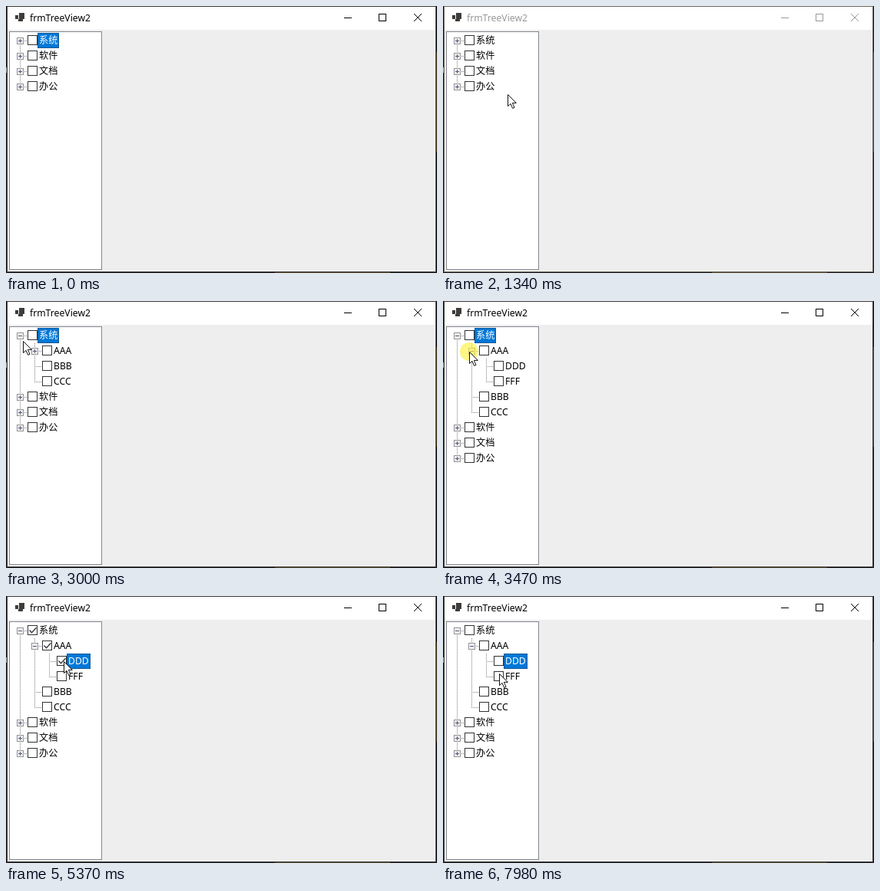
Animation of 561x348 px, one loop 8000 ms. Source, as an HTML page:

```html
<!DOCTYPE html>
<html lang="zh-CN">
<head>
<meta charset="utf-8">
<style>
html, body { margin: 0; width: 100%; height: 100%; overflow: hidden; }
svg { display: block; }
text { font: 12.2px "Noto Sans", "Noto Sans CJK SC", "Noto Sans CJK", sans-serif; }
.px { shape-rendering: crispEdges; }
.dots { stroke: #808080; stroke-dasharray: 1 1; }
</style>
</head>
<body>
<svg width="561" height="348" viewBox="0 0 561 348" fill="none">
  <g id="window"></g>
  <circle id="halo" r="12" fill="#fbf03c" fill-opacity=".62"/>
  <path id="cursor" d="M.5 .5V15.6L4 12.4L6.6 18.4L9 17.4L6.4 11.4H11.3Z" fill="#fff" stroke="#111"/>
</svg>
<script>
const LOOP = 8000, STEP = 70;
const $ = id => document.getElementById(id);

// Pointer keys: time, x, y
const path = [
  [440, 334, 330], [790, 117, 165], [920, 117, 165], [1340, 84, 115], [1760, 40, 64],
  [2320, 20, 49], [2930, 20, 49], [3350, 34, 66], [3530, 34, 66], [3740, 36, 81],
  [4020, 62, 108], [4160, 77, 96], [4350, 77, 96], [4690, 75, 103], [4820, 75, 103],
  [5100, 75, 85], [6440, 75, 85], [6580, 73, 84], [7580, 73, 84], [7980, 73, 101]
];
const clicks = [[2440, 2590], [3470, 3600], [5230, 5370], [6780, 6920]];
const [openRoot, openChild, check, uncheck] = clicks.map(c => c[0]);

const tree = [
  ['系统', [['AAA', [['DDD'], ['FFF']]], ['BBB'], ['CCC']]],
  ['软件', []], ['文档', []], ['办公', []]
];

const rect = (x, y, w, h, fill, extra = '') =>
  `<rect class="px" x="${x}" y="${y}" width="${w}" height="${h}" fill="${fill}" ${extra}/>`;
const line = (d, stroke, cls = 'px') => `<path class="${cls}" d="${d}" stroke="${stroke}"/>`;
const label = (x, y, s, fill) => `<text x="${x}" y="${y}" fill="${fill}">${s}</text>`;

function frame(active) {
  const ink = active ? '#000' : '#999';
  const edge = active ? '#3c3b39' : '#6a675c';
  return rect(0, 0, 561, 348, '#1d1c20')
    + rect(560, 60, 1, 130, '#5c4a2a') + rect(350, 347, 150, 1, '#5a4a30')
    + rect(0, 80, 1, 7, '#aaa')
    + rect(1, 0, 559, 347, edge)
    + rect(2, 1, 557, 30, '#fff') + rect(2, 31, 557, 315, '#eee')
    + rect(4.5, 33.5, 120, 310, '#fff', 'stroke="#828790"')
    + rect(17, 9, 7, 8, '#3f3c3a') + rect(12, 12, 4, 5, '#3f3c3a') + rect(16, 17, 6, 3, '#3f3c3a')
    + label(31, 20, 'frmTreeView2', ink)
    + line('M440 15.5H450', ink) + line('M485.5 10.5H494.5V19.5H485.5Z', ink)
    + line('M531 10L541 20M541 10L531 20', ink, '');
}

function treeView({ open, checked, selected }) {
  let row = 0, lines = '', items = '';
  const visit = (nodes, depth) => {
    const x = 18 + 19 * depth;
    const top = depth ? 35 + 20 * row : 45;
    let y;
    for (const [name, kids] of nodes) {
      y = 45 + 20 * row++;
      const isOpen = open.includes(name), isSelected = name === selected;
      lines += line(`M${x} ${y + .5}H${x + 9}`, '#808080', 'px dots');
      if (kids) items += rect(x - 3.5, y - 3.5, 8, 8, '#f8f8f8', 'stroke="#919191"')
        + line(`M${x - 2} ${y + .5}h5` + (isOpen ? '' : `M${x + .5} ${y - 2}v5`), '#4b5577');
      items += rect(x + 10.5, y - 6.5, 12, 12, '#fff', 'stroke="#333"');
      if (checked.includes(name))
        items += `<path d="M${x + 12.5} ${y - .5}l3 3.2l6-6.4" stroke="#333" stroke-width="1.3"/>`;
      if (isSelected) {
        const w = depth ? 31 : 28;
        items += rect(x + 23, y - 10, w, 20, '#0078d7')
          + rect(x + 23.5, y - 9.5, w - 1, 19, 'none', 'stroke="#1c3a5a" stroke-dasharray="1 1"');
      }
      items += label(x + 25, y + 4, name, isSelected ? '#fff' : '#000');
      if (isOpen) visit(kids, depth + 1);
    }
    lines += line(`M${x + .5} ${top}V${y + 1}`, '#808080', 'px dots');
  };
  visit(tree, 0);
  return lines + items;
}

function stateAt(t) {
  const active = t < 240 || t >= openRoot;
  return {
    active,
    open: t < openRoot ? [] : t < openChild ? ['系统'] : ['系统', 'AAA'],
    checked: t >= check && t < uncheck ? ['系统', 'AAA', 'DDD'] : [],
    selected: !active ? '' : t < check ? '系统' : 'DDD'
  };
}

function pointer(t) {
  const i = path.findIndex(k => k[0] > t);
  if (i < 0) return path[path.length - 1].slice(1);
  const [t0, x0, y0] = path[i - 1], [t1, x1, y1] = path[i];
  const f = Math.floor((t - t0) / STEP) * STEP / (t1 - t0);
  return [Math.round(x0 + (x1 - x0) * f), Math.round(y0 + (y1 - y0) * f)];
}

let shown = '';
function draw(t) {
  const state = stateAt(t), key = JSON.stringify(state);
  if (key !== shown) {
    $('window').innerHTML = frame(state.active) + treeView(state);
    shown = key;
  }
  const visible = t >= path[0][0];
  const pressed = clicks.some(([a, b]) => t >= a && t < b);
  $('cursor').style.display = visible ? '' : 'none';
  $('halo').style.display = pressed ? '' : 'none';
  if (visible) {
    const move = `translate(${pointer(t)})`;
    $('cursor').setAttribute('transform', move);
    $('halo').setAttribute('transform', move);
  }
}

const start = performance.now();
function tick() {
  draw((performance.now() - start) % LOOP);
  requestAnimationFrame(tick);
}
tick();
</script>
</body>
</html>
```
